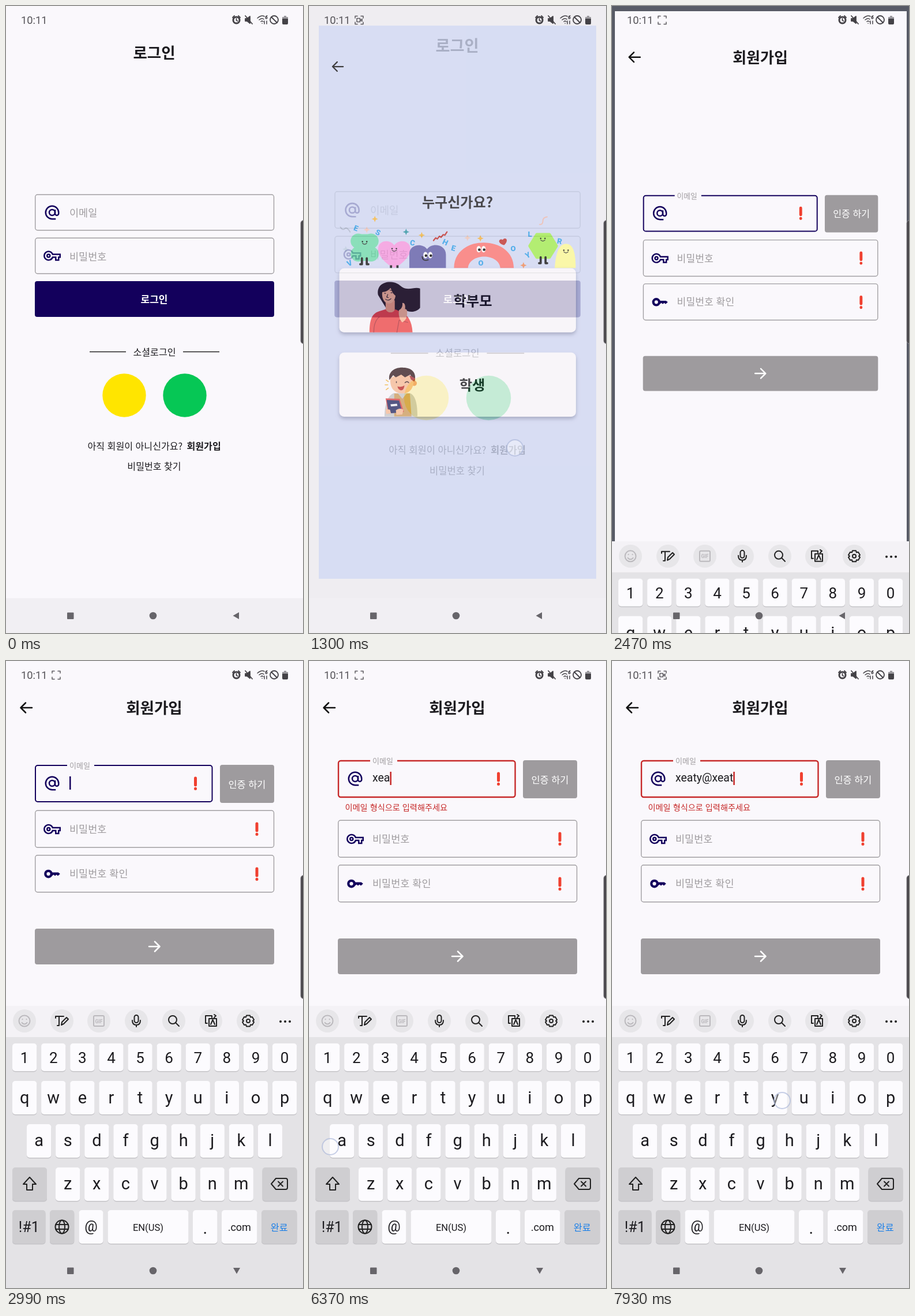
Animation, 515 px wide and 1087 px high, one loop 8 s. Source, as an HTML page:

```html
<!DOCTYPE html>
<html lang="ko">
<head>
<meta charset="utf-8">
<title>Sign-up flow</title>
<style>
  html, body { margin: 0; width: 100%; height: 100%; overflow: hidden; background: #faf8fc; }
  svg { display: block; width: 100vw; height: 100vh; --t: 0; --navy: #13005c; --gray: #9e9b9e; }
  text { font-family: "Noto Sans CJK KR", "Noto Sans CJK", sans-serif; fill: #1c1b1f; }
  .roboto { font-family: Roboto, sans-serif; }
  .bold { font-weight: 700; }
  .mid { text-anchor: middle; }
  .hint { font-size: 17.5px; fill: #a09da0; }
  .white { fill: #fff; }
  .line { fill: none; stroke-linecap: round; stroke-linejoin: round; }
  .box { fill: none; stroke: #a19fa2; stroke-width: 1.4; }
  .letters text { font: 900 14px Roboto, sans-serif; fill: #2b9ee8; text-anchor: middle; }

  /* Every animation is paused and positioned by --t. */
  .anim { animation: var(--name) var(--dur, 390ms) linear both paused; animation-delay: calc((var(--start) - var(--t)) * 1ms); }
  .page { transform-origin: 257.5px 513.5px; }
  .first { --start: 1213; }
  .second { --start: 2310; }
  .enter { --name: grow; }
  .leave { --name: swell; }
  .fade { --name: appear; }
  .scrim { --name: dim; }
  .rise { --name: rise; --start: 2400; --dur: 330ms; }
  .settle { --name: settle; --start: 2400; --dur: 330ms; }
  .lens { --name: blink; --start: 0; --dur: 650ms; animation-iteration-count: infinite; }
  .recorder { --name: appear-hard; --start: 0; --dur: 130ms; }
  .warning { --name: show; --start: 5930; --dur: 200ms; }
  @keyframes grow {
    0% { transform: scale(.85); animation-timing-function: cubic-bezier(.05, 0, .1333, .06); }
    16.667% { transform: scale(.91); animation-timing-function: cubic-bezier(.2083, .82, .25, 1); }
    100% { transform: scale(1); }
  }
  @keyframes swell {
    0% { transform: scale(1); animation-timing-function: cubic-bezier(.05, 0, .1333, .06); }
    16.667% { transform: scale(1.02); animation-timing-function: cubic-bezier(.2083, .82, .25, 1); }
    100% { transform: scale(1.05); }
  }
  @keyframes appear { 0%, 12.5% { opacity: 0; } 25%, 100% { opacity: 1; } }
  @keyframes dim { 0%, 20.75% { opacity: 0; } 41.75%, 100% { opacity: .6; } }
  @keyframes rise { from { transform: translateY(489px); animation-timing-function: ease-out; } }
  @keyframes settle { from { transform: translateY(214px); animation-timing-function: ease-out; } }
  @keyframes blink { 0%, 59.9% { opacity: 1; } 60%, 100% { opacity: 0; } }
  @keyframes appear-hard { 0%, 99.9% { opacity: 0; } 100% { opacity: 1; } }
  @keyframes show { from { opacity: 0; } to { opacity: 1; } }

  .outline { fill: none; stroke: var(--navy); stroke-width: 2; }
  #cursor { fill: var(--navy); }
  .warning { visibility: hidden; }
  .error .outline { stroke: #c62828; stroke-width: 2.4; }
  .error #cursor { fill: #c62828; }
  .error .warning { visibility: visible; }
  .error .upper { transform: translateY(-8px); }
  .error .lower { transform: translateY(17px); }
</style>
</head>
<body>
<svg id="stage" viewBox="0 0 515 1087" preserveAspectRatio="none">
  <defs>
    <filter id="shadow" x="-10%" y="-20%" width="120%" height="150%">
      <feDropShadow dx="0" dy="4" stdDeviation="3.5" flood-color="#5c6080" flood-opacity=".5"/>
    </filter>
    <g id="at" class="line" stroke="#13005c" stroke-width="2" transform="scale(1.25) translate(-12 -12)">
      <circle cx="12" cy="12" r="4"/><path stroke-linecap="butt" d="M17 21h-5a9 9 0 1 1 9-9v1.4a2.5 2.5 0 0 1-5 0V8"/>
    </g>
    <g id="key" fill="none" stroke="#13005c" stroke-width="2" transform="scale(1.25) translate(-12 -12)">
      <path d="M12.7 10H23v4h-2v4h-4v-4h-4.3a6 6 0 1 1 0-4z"/><circle cx="7" cy="12" r="2"/>
    </g>
    <g id="solidKey" fill="#13005c" transform="scale(1.25) translate(-12 -12)">
      <circle cx="6.8" cy="12" r="4.2" fill="none" stroke="#13005c" stroke-width="3.4"/>
      <path d="M11 10h9.5l2.6 2-3.1 2.8-2-1.7-2 1.7-2-1.7-1.6 1.2H11z"/>
    </g>
    <g id="bang" class="line" stroke="#f04030" stroke-width="5"><path d="M0-9V3M0 9.3v.2"/></g>
    <path id="back" class="line" stroke="#111" stroke-width="2.5" d="M10 0H-9M-1-8.5-9.5 0-1 8.5"/>
    <path id="spark" d="M0-6 1.7-1.7 6 0 1.7 1.7 0 6-1.7 1.7-6 0-1.7-1.7z"/>
    <path id="heart" d="M0 50C-14 44-30 28-30 15-30-2-8-4 0 8 8-4 30-2 30 15 30 28 14 44 0 50z"/>
    <g id="face"><circle cx="-4" r="1.3"/><circle cx="4" r="1.3"/><path class="line" stroke="#222" stroke-width="1.2" d="M-4 3q4 4 8 0"/></g>
    <g id="eyes"><g fill="#fff"><ellipse cx="-4" rx="4" ry="6"/><ellipse cx="5" rx="4" ry="6"/></g><circle cx="-3" cy="1" r="2.5"/><circle cx="6" cy="1" r="2.5"/></g>
    <path id="legs" class="line" stroke="#111" stroke-width="4" d="M-4-8V3h-3M5-8V3h3"/>
  </defs>

  <!-- Login -->
  <g class="page anim leave first">
    <rect x="-15" y="-15" width="545" height="1060" fill="#faf8fc"/>
    <text class="bold mid" x="257" y="91" font-size="26.5">로그인</text>
    <rect class="box" x="50.7" y="327" width="413.8" height="61.7" rx="4"/>
    <rect class="box" x="50.7" y="402.3" width="413.8" height="61.7" rx="4"/>
    <use href="#at" x="80" y="358"/><use href="#key" x="80" y="433"/>
    <text class="hint" x="110" y="365">이메일</text>
    <text class="hint" x="110" y="440.5">비밀번호</text>
    <rect x="50" y="477" width="415" height="62" rx="4" fill="#13005c"/>
    <text class="bold mid white" x="257" y="514.5" font-size="17">로그인</text>
    <path d="M145 599.5h63M307 599.5h63" stroke="#222" stroke-width="1.5"/>
    <g font-size="16.1">
      <text class="mid" x="257.5" y="605.5">소셜로그인</text>
      <text x="141.5" y="768.5">아직 회원이 아니신가요?</text>
      <text class="bold" x="313.5" y="768.5">회원가입</text>
      <text class="mid" x="257" y="803.5">비밀번호 찾기</text>
    </g>
    <circle cx="205" cy="675" r="37.7" fill="#ffe500"/>
    <circle cx="310" cy="675" r="37.7" fill="#06c755"/>
  </g>

  <!-- Role choice -->
  <rect class="anim scrim first" width="515" height="1027"/>
  <g class="anim fade first"><g class="page anim enter first"><g class="page anim leave second">
    <rect width="515" height="1027" fill="#d2d9f4"/>
    <use href="#back" x="35" y="76"/>
    <text class="bold mid" x="257.5" y="337.5" font-size="25.8">누구신가요?</text>
    <g id="friends">
      <g fill="#6fdcab"><circle cx="73" cy="400" r="14"/><circle cx="97" cy="400" r="14"/><circle cx="73" cy="424" r="14"/><circle cx="97" cy="424" r="14"/><path d="M73 387h24v50H73z"/></g>
      <use href="#legs" x="84" y="440"/><use href="#face" x="85" y="401"/>
      <use href="#heart" x="140" y="400" fill="#f79ae0"/><use href="#face" x="140" y="414"/>
      <path d="M134 450v-5M146 450v-5" stroke="#111" stroke-width="4"/>
      <path fill="#5f5ca8" d="M168 450v-26c0-18 24-21 33-9 9-13 35-9 35 10v25z"/><use href="#eyes" x="202" y="426"/>
      <path class="line" stroke="#111" stroke-width="2" d="M192 429q1 9 11 6"/>
      <path fill="#fb7571" d="M251 450c0-30 25-47 55-47s56 17 56 47h-25c-3-28-57-28-60 0z"/><use href="#eyes" x="301" y="415"/>
      <path fill="#a3ee4f" stroke="#a3ee4f" stroke-width="6" stroke-linejoin="round" d="M405 388h23l13 21-13 21h-23l-13-21z"/>
      <use href="#legs" x="416" y="438"/><use href="#face" x="416" y="395"/>
      <path fill="#fdfa94" d="M438 450c2-28 8-45 21-45s18 16 18 45z"/><use href="#face" x="459" y="417"/>
      <g class="letters" id="letters"></g>
      <g id="sparks"></g>
      <path class="line" stroke="#c0302c" stroke-width="2.5" d="m213 399 4-5 3 2 4-5 3 2 4-5 3 1 4-6"/>
      <use href="#heart" fill="#c0302c" transform="translate(341 396) rotate(-15) scale(.24)"/>
      <path class="line" stroke="#aeb7cc" stroke-width="2" d="M40 374q4 7 8 3t10 6"/>
      <path class="line" stroke="#edb9ab" stroke-width="2" d="M410 369q6 1 6-6t8-8"/>
    </g>
    <g fill="#faf8fc" filter="url(#shadow)">
      <rect x="38" y="450.5" width="439.5" height="119" rx="9"/>
      <rect x="38" y="607" width="439.5" height="119" rx="9"/>
    </g>
    <g class="bold" font-size="26"><text x="250" y="520">학부모</text><text x="261" y="676.5">학생</text></g>

    <g id="parent">
      <path fill="#33282d" d="M110 500c-3-17 10-25 24-24 16 1 17 10 27 12 10 2 18-3 27 0v36c-7 9-22 10-31 1-7 8-18 13-27 8z"/>
      <path fill="#f2a585" d="M124 510h17v23h-17z"/><ellipse cx="130" cy="499" rx="12.5" ry="17" fill="#fabb9a"/>
      <path fill="#33282d" d="M117 495c1-16 14-22 25-11l3 19c-9-5-9-11-12-16-5 6-9 7-16 8z"/>
      <path fill="#ef4b4b" d="M94 569.500c0-24 5-35 18-39l12-4c4 8 14 8 18 0l15 7c11 7 16 19 17 36z"/>
      <path class="line" stroke="#a82f38" stroke-width="1.3" d="M102 569q0-20 10-28M145 569l4-22 16 4"/>
      <path fill="#fabb9a" d="M149 528c5-2 7-8 6-13 5-1 6 6 5 11 4 0 4 4 4 7 0 8-2 14-9 18-5-4-8-15-6-23z"/>
      <path class="line" stroke="#33282d" stroke-width="1.2" d="M122 497h2M134 496h2M128 499l-2 5 3 1M124 508q5 4 10-1M120 492l5-1M132 491l5 1"/>
    </g>

    <g id="student">
      <path fill="#c9c8ca" d="M122 725.500c0-20 5-38 17-43h30c11 4 14 21 14 43z"/>
      <path fill="#cf9f60" d="M140 683h7l8 10 8-10h6l3 42.500h-32z"/>
      <circle cx="177" cy="664" r="5" fill="#f1a281"/>
      <path fill="#f8bd98" d="M133 655q22-17 43 0c1 16-5 28-21 28s-24-12-22-28z"/>
      <path fill="#3a2226" d="M131 658c-3-15 10-24 26-23 16 0 25 10 21 25l-5-4-3-8-10 5-7-5-10 5-5-4z"/>
      <path fill="#a83238" d="m168 649 11 6-2 6-6-4z"/>
      <path class="line" stroke="#3a2226" stroke-width="1.6" d="M144 661v2M160 663q4-4 7 0"/>
      <path fill="#c0302c" d="M146 670q8 2 13-2-1 10-7 9-5-1-6-7z"/>
      <path class="line" stroke="#f2b53d" stroke-width="1.600" d="m125 658 4 3M123 667h5M125 676l4-3"/>
      <path fill="#dd4648" d="m124 692 26 1 8 24-29 3z"/><path fill="#2b2e66" d="m126 695 23 1 6 22-25 2z"/>
      <path fill="#f3f1f5" d="m133 703 12-1 1 4-12 1z"/>
      <path fill="#f8bd98" d="M143 714q7-5 14-1l-2 9-11 1zM124 712l8 1 2 7-9 1z"/>
    </g>
  </g></g></g>

  <!-- Sign-up -->
  <rect class="anim scrim second" width="515" height="1027"/>
  <g class="anim fade second"><g class="page anim enter second">
    <rect width="515" height="1027" fill="#faf8fc"/>
    <use href="#back" x="35" y="81"/>
    <text class="bold mid" x="257" y="91" font-size="26.5">회원가입</text>
    <g id="form"><g class="anim settle">
      <g class="upper">
        <path class="outline" d="M106 181H55a4 4 0 0 0-4 4v55a4 4 0 0 0 4 4h298.500a4 4 0 0 0 4-4v-55a4 4 0 0 0-4-4H153"/>
        <text class="hint" x="110" y="186" style="font-size:13px">이메일</text>
        <use href="#at" x="80" y="212"/><use href="#bang" x="328.500" y="212"/>
        <text class="roboto" id="typed" x="110" y="217" font-size="19.5"></text>
        <rect id="cursor" y="200" width="2.500" height="23"/>
        <rect x="371" y="180" width="94" height="66" rx="4" fill="#9e9b9e"/>
        <text class="mid white" x="418" y="219.500" font-size="16.4" font-weight="500">인증 하기</text>
        <text class="anim warning" x="62.500" y="267" font-size="14.200" style="fill:#c62828">이메일 형식으로 입력해주세요</text>
      </g>
      <g class="lower">
        <rect class="box" x="50.700" y="259.300" width="413.800" height="64" rx="4"/>
        <rect class="box" x="50.700" y="336.700" width="413.800" height="64" rx="4"/>
        <use href="#key" x="80" y="291.500"/><use href="#solidKey" x="80" y="369"/>
        <use href="#bang" x="435" y="291"/><use href="#bang" x="435" y="369"/>
        <text class="hint" x="110" y="298">비밀번호</text>
        <text class="hint" x="110" y="375">비밀번호 확인</text>
        <rect x="50" y="464" width="415" height="62" rx="4" fill="#9e9b9e"/>
        <path class="line" stroke="#fff" stroke-width="2.500" d="M248 495h18M258 486.500l8.500 8.500-8.500 8.500"/>
      </g>
    </g></g>
  </g></g>

  <rect y="1026.500" width="515" height="61" fill="#f1eff3"/>

  <!-- Keyboard -->
  <g class="anim rise">
    <rect y="598" width="515" height="489" fill="#e4e3e6"/>
    <rect y="598" width="515" height="54" fill="#f4f2f6"/>
    <g id="keys" class="mid"></g>
    <g class="line" stroke="#222" stroke-width="2">
      <g stroke="#bbb9bd"><circle cx="32" cy="624" r="9.500"/><path d="M28.500 621v.2M35.500 621v.2M27.500 627q4.500 5 9 0"/><rect x="152" y="615" width="18" height="18" rx="2"/></g>
      <path d="M86 616h14M86 616v3M92 616v16h-3M96 631l1-5 8-8 3 3-8 8z"/>
      <rect x="222.500" y="614" width="7" height="13" rx="3.500"/><path d="M219 623q0 8 7 8t7-8M226 631v3"/>
      <circle cx="289" cy="622" r="7"/><path d="m294 627 6 6"/>
      <path d="M349 628h-3v-13h11v3M352 620h13v13h-13zM355 630l3.500-8 3.500 8M361 613l3 2-3 3"/>
      <circle cx="420" cy="624" r="3"/><path d="m417 614.500h6l1 3 3-.5 3 5-2 2 2 2-3 5-3-.5-1 3h-6l-1-3-3 .5-3-5 2-2-2-2 3-5 3 .5z"/>
      <path stroke-width="4" d="M476 625h.1M484 625h.1M492 625h.1"/>
      <path d="m41 895 11 12h-6v10H36v-10h-6z"/>
      <path d="M468 897h17a3 3 0 0 1 3 3v13a3 3 0 0 1-3 3h-17l-8-9.500zM472 902.500l8 8M480 902.500l-8 8"/>
      <circle cx="97" cy="981" r="11.500"/><ellipse cx="97" cy="981" rx="5" ry="11.500"/><path d="M86 977h22M86 985h22"/>
    </g>
    <text class="roboto mid bold" x="161" y="627.500" font-size="8.500" style="fill:#bbb9bd">GIF</text>
  </g>

  <!-- System bars -->
  <g fill="#67656a">
    <rect x="106" y="1051.500" width="11.500" height="11.500" rx="1"/><circle cx="255" cy="1057" r="6.300"/>
    <path id="navBack"/>
  </g>
  <text class="roboto" x="26" y="30.500" font-size="18.300" style="fill:#555358">10:11</text>
  <g class="line anim recorder" stroke="#5c5a5f" stroke-width="1.500">
    <path d="M80 21v-3.500h4M90 17.500h4V21M94 28v3.500h-4M84 31.500h-4V28"/>
    <path class="anim lens" d="M83 21.500h5.500v6H83zM89 24.500l3-2v4z"/>
  </g>
  <g class="line" stroke="#444247" stroke-width="1.800">
    <circle cx="399.500" cy="24.500" r="5.500" stroke-width="3"/><path d="M399.500 22v3l2 1M393 20l3-3M406 20l-3-3"/>
    <path fill="#444247" d="M415 22h3l5-4v12l-5-4h-3z"/><path d="m415 17 12 14"/>
    <path d="M436 21q7-6 12-3M439 24q5-4 8-1M442 27q2-2 4 0M444 30h.2M448 26v5M452 31v-5" stroke-width="1.500"/>
    <path d="M453 17q-3 0-3 4a1.500 1.500 0 1 0 1-2" stroke-width="1.400"/>
    <circle cx="465" cy="24" r="7"/><path d="m460 19 10 10"/>
  </g>
  <path fill="#444247" d="M482 17h4v2h3v11q0 2-2 2h-6q-2 0-2-2V19h3z"/><path fill="#9b999e" d="M482 17h4v2h3v3h-10v-3h3z"/>
  <rect x="511" y="371.500" width="10" height="214" rx="5" fill="#48464a" stroke="#8d8b90"/>
  <circle id="tap" r="14" fill="#fff" fill-opacity=".4" stroke="#a9b5d8" stroke-opacity=".65" stroke-width="2"/>
</svg>

<script>
  const LOOP = 8000, STEP = 130;
  const $ = id => document.getElementById(id);

  // Confetti: letter, x, baseline, rotation / x, y, colour
  $('letters').innerHTML = [
    ['V', 57, 446, -25], ['E', 69, 381, 20], ['S', 110, 389, 25], ['C', 174, 408, 10], ['H', 235, 407, 25],
    ['E', 250, 418, 15], ['O', 301, 446, 0], ['O', 361, 419, 0], ['Y', 388, 431, -25], ['L', 392, 392, 0], ['R', 447, 405, 10]
  ].map(([ch, x, y, r]) => `<text x="${x}" y="${y}" transform="rotate(${r} ${x} ${y - 5})">${ch}</text>`).join('');
  $('sparks').innerHTML = [
    [104, 359, '#f6b73c'], [89, 379, '#f3c4b4'], [162, 383, '#2b93a0'], [191, 389, '#f2b53d'],
    [276, 394, '#edc5b5'], [300, 395, '#f4b13c'], [380, 445, '#ef8a56'], [50, 415, '#bccde0']
  ].map(([x, y, fill]) => `<use href="#spark" x="${x}" y="${y}" fill="${fill}"/>`).join('');

  // Keyboard
  const PITCH = 50.1;
  const key = (x, y, w, h, label = '', size = 29, baseline = 0, fill = '#fcfbfe', ink = '#1c1b1f') =>
    `<rect x="${x}" y="${y + 1.5}" width="${w}" height="${h}" rx="5" fill="#c5c4c8"/>
     <rect x="${x}" y="${y}" width="${w}" height="${h}" rx="5" fill="${fill}"/>
     <text class="roboto" x="${x + w / 2}" y="${baseline}" font-size="${size}" style="fill:${ink}">${label}</text>`;
  const row = (chars, x, y, h, size, baseline) =>
    [...chars].map((ch, i) => key(x + i * PITCH, y, 42.3, h, ch, size, baseline)).join('');
  const DARK = '#cfced1';
  $('keys').innerHTML =
    [32, 97, 161, 226, 291, 355, 420].map(x => `<circle cx="${x}" cy="624" r="20" fill="#e7e6e9"/>`).join('') +
    row('1234567890', 11, 663, 48, 26, 697) +
    row('qwertyuiop', 11, 728, 58, 29, 767) +
    row('asdfghjkl', 36, 803, 58, 29, 841) +
    row('zxcvbnm', 86, 878, 58, 29, 916) +
    key(11, 878, 60, 58, '', 0, 0, DARK) + key(444.5, 878, 60, 58, '', 0, 0, DARK) +
    key(11, 952, 57.5, 58, '!#1', 25, 990, DARK) + key(76, 952, 42.3, 58, '', 0, 0, DARK) +
    key(126.5, 952, 42, 58, '@', 25, 989) + key(176.5, 952, 140, 58, 'EN(US)', 16.5, 988) +
    key(324, 952, 42.5, 58, '.', 29, 993) + key(374, 952, 61.5, 58, '.com', 18, 988) +
    key(443, 952, 61.5, 58, '<tspan font-family="Noto Sans CJK KR, sans-serif">완료</tspan>', 16.3, 987.5, DARK, '#1a7fe8');

  // Taps: start, end, x, y
  const taps = [
    [1040, 1430, 357, 766], [2080, 2340, 324, 503],
    [5850, 5980, 157, 910], [6110, 6240, 132, 762], [6240, 6500, 37, 842], [6500, 6630, 232, 762],
    [6760, 6890, 295, 762], [7020, 7150, 150, 985], [7280, 7410, 157, 910], [7410, 7540, 132, 762],
    [7670, 7800, 37, 842], [7800, 7930, 232, 762], [7930, 8000, 295, 762]
  ];
  const ADDRESS = 'xeaty@xeat';
  const strokes = [5980, 6240, 6370, 6630, 6890, 7150, 7410, 7540, 7800, 7930];

  function draw(t) {
    $('stage').style.setProperty('--t', t);

    const count = strokes.filter(s => s <= t).length;
    $('typed').textContent = ADDRESS.slice(0, count);
    $('form').classList.toggle('error', count > 0);

    const cursorOn = t >= 5850 || (t >= 2990 && (t - 2990) % 1300 < 650);
    $('cursor').setAttribute('opacity', cursorOn ? 1 : 0);
    $('cursor').setAttribute('x', 110 + (count ? $('typed').getComputedTextLength() : 0));

    const tap = taps.find(([from, to]) => t >= from && t < to);
    $('tap').setAttribute('visibility', tap ? 'visible' : 'hidden');
    if (tap) $('tap').setAttribute('transform', `translate(${tap[2]} ${tap[3]})`);

    $('navBack').setAttribute('d', t < 2600 ? 'M404 1051v12l-10.500-6z' : 'M394 1052h12l-6 10.500z');
  }

  function tick(now) {
    const t = now % LOOP;
    draw(t - t % STEP);
    requestAnimationFrame(tick);
  }
  draw(0);
  requestAnimationFrame(tick);
</script>
</body>
</html>
```
